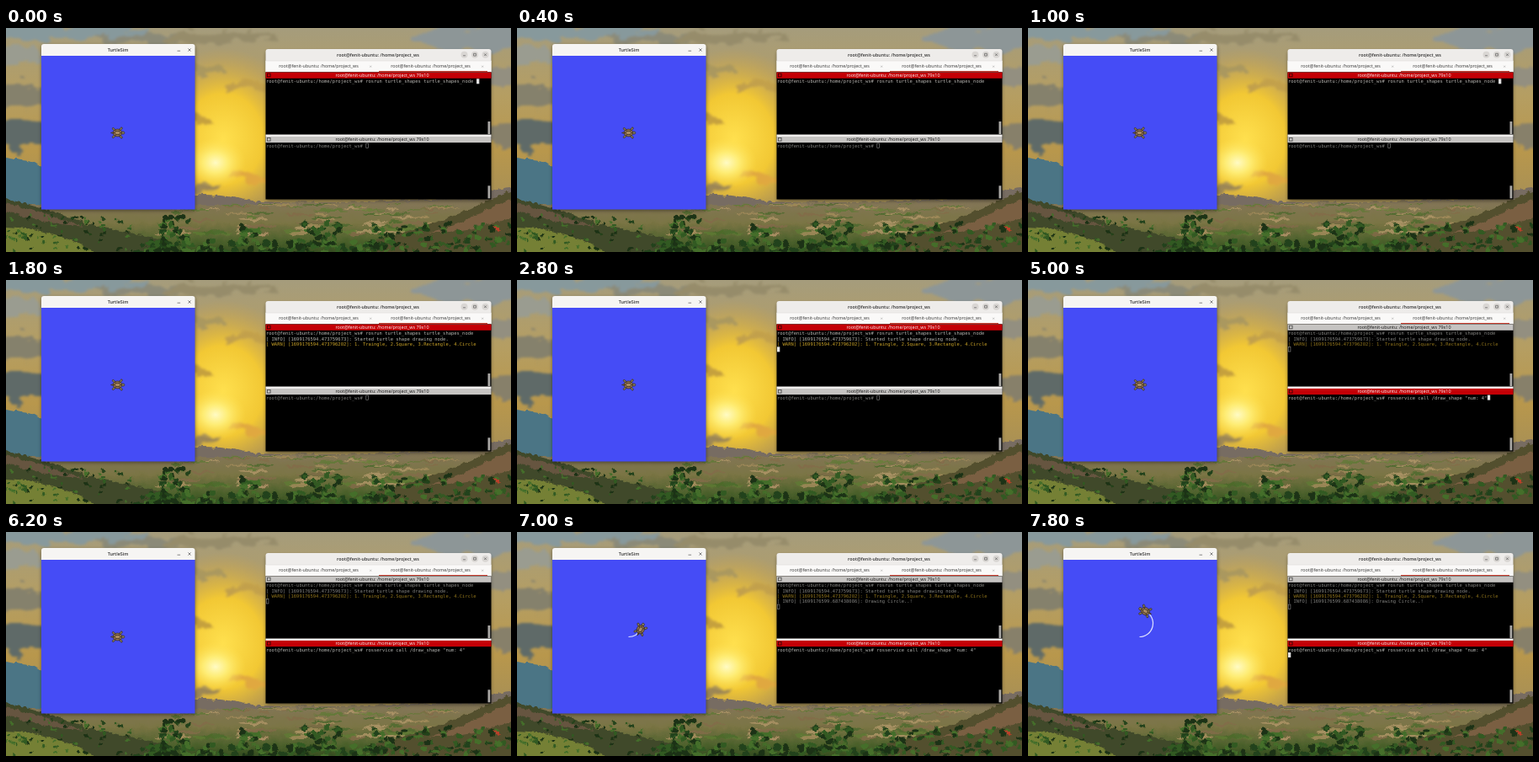
These frames come from a looping animation (600 px wide and 266 px high, 8 s). An HTML page:

```html
<!DOCTYPE html>
<html lang="en">
<head>
<meta charset="utf-8">
<title>Turtle shapes</title>
<style>
html, body { margin: 0; width: 100%; height: 100%; overflow: hidden; background: #444; }
svg { position: absolute; left: 0; top: 0; width: 600px; height: 266px; }
#scenery { will-change: transform; }
text { white-space: pre; }
.ui { font-family: "Open Sans", "Noto Sans", sans-serif; font-size: 5.36px; fill: #333; }
.mid { text-anchor: middle; }
.bold { font-weight: 600; }
.term { font-family: "DejaVu Sans Mono", monospace; font-size: 5.465px; fill: #b4b4b0; }
</style>
</head>
<body>
<svg id="scenery" viewBox="0 0 600 266" xmlns="http://www.w3.org/2000/svg">
  <defs>
    <linearGradient id="sky" x2="0" y2="1">
      <stop offset="0" stop-color="#a59c7c"/>
      <stop offset=".3" stop-color="#b59e62"/>
      <stop offset=".55" stop-color="#b8974c"/>
      <stop offset=".75" stop-color="#a89055"/>
      <stop offset="1" stop-color="#5c6a55"/>
    </linearGradient>
    <radialGradient id="glow">
      <stop offset="0" stop-color="#ffe04e"/>
      <stop offset=".5" stop-color="#f2c834"/>
      <stop offset="1" stop-color="#d0a545" stop-opacity="0"/>
    </radialGradient>
    <radialGradient id="sun">
      <stop offset="0" stop-color="#fffbc4"/>
      <stop offset=".4" stop-color="#fff07c" stop-opacity=".9"/>
      <stop offset="1" stop-color="#ffe04e" stop-opacity="0"/>
    </radialGradient>
    <linearGradient id="valley" x2="0" y2="1">
      <stop offset="0" stop-color="#85765a"/>
      <stop offset=".4" stop-color="#7a7444"/>
      <stop offset=".7" stop-color="#4a602b"/>
      <stop offset="1" stop-color="#263f18"/>
    </linearGradient>
    <filter id="ragged" x="-10%" y="-10%" width="120%" height="120%">
      <feTurbulence type="fractalNoise" baseFrequency=".035 .06" numOctaves="4" seed="5"/>
      <feDisplacementMap in="SourceGraphic" scale="30" xChannelSelector="R" yChannelSelector="G"/>
      <feGaussianBlur stdDeviation="1.8"/>
    </filter>
    <filter id="rough" x="-5%" y="-10%" width="110%" height="120%">
      <feTurbulence type="fractalNoise" baseFrequency=".12" numOctaves="3" seed="9"/>
      <feDisplacementMap in="SourceGraphic" scale="7" xChannelSelector="R" yChannelSelector="G"/>
      <feGaussianBlur stdDeviation=".35"/>
    </filter>
  </defs>
  <rect width="600" height="266" fill="url(#sky)"/>
  <ellipse cx="258" cy="132" rx="95" ry="108" fill="url(#glow)"/>
  <g id="clouds" filter="url(#ragged)"></g>
  <ellipse cx="249" cy="160" rx="36" ry="30" fill="url(#sun)"/>
  <g filter="url(#rough)">
    <path d="M-9 152 Q25 156 50 166 T110 190 T225 202 Q262 206 310 208 V230 H-9Z" fill="#4b7585"/>
    <path d="M215 199 Q250 196 280 203 T430 206 T540 202 L610 186 V235 H215Z" fill="#776c62"/>
    <path d="M-9 208 Q130 212 260 210 T610 202 V276 H-9Z" fill="url(#valley)"/>
    <g id="fields"></g>
    <path d="M-9 203 Q30 207 58 219 T112 236 Q150 244 190 252 V276 H-9Z" fill="#41482a"/>
    <path d="M-9 207 Q26 212 48 221 T96 236 Q62 234 30 226 T-9 218Z" fill="#66543f"/>
    <path d="M-9 236 Q24 235 60 246 T118 276 H-9Z" fill="#748034"/>
    <path d="M610 190 Q578 202 560 211 T506 232 Q476 242 440 252 V276 H610Z" fill="#534f2d"/>
    <path d="M610 200 Q574 214 548 227 T500 244 Q556 242 610 222Z" fill="#7a5f43"/>
    <g id="trees"></g>
    <path d="M577 236 l8 1 3 4 -7 -1Z" fill="#b8402c"/>
  </g>
</svg>

<svg viewBox="0 0 600 266" xmlns="http://www.w3.org/2000/svg">
  <filter id="shadow" x="-10%" y="-10%" width="120%" height="125%"><feGaussianBlur stdDeviation="2"/></filter>
  <rect x="42" y="21" width="183" height="196" rx="3" opacity=".4" filter="url(#shadow)"/>
  <path d="M42 33 V22 Q42 19 45 19 H221.500 Q224.500 19 224.500 22 V33Z" fill="#f6f5f3"/>
  <rect x="42" y="33" width="182.500" height="182.500" fill="#454cf6"/>
  <text class="ui mid bold" x="133" y="28">TurtleSim</text>
  <path d="M203.500 27.200 h3.600 M216.400 24.400 l3.200 3.200 m0 -3.200 l-3.200 3.200" stroke="#555" stroke-width=".7"/>
  <path id="trail" fill="none" stroke="#dcdfff" stroke-width="1.2"/>
  <g id="turtle" stroke="#35291c" stroke-width=".7">
    <g fill="#8a8060">
      <ellipse cx="4" cy="-4.700" rx="2.200" ry="1.200" transform="rotate(-50 4 -4.700)"/>
      <ellipse cx="4" cy="4.700" rx="2.200" ry="1.200" transform="rotate(50 4 4.700)"/>
      <ellipse cx="-4.500" cy="-4.400" rx="2" ry="1.100" transform="rotate(45 -4.500 -4.400)"/>
      <ellipse cx="-4.500" cy="4.400" rx="2" ry="1.100" transform="rotate(-45 -4.500 4.400)"/>
      <ellipse cx="6.300" cy="0" rx="2" ry="1.600"/>
      <path d="M-5 -1 L-8 0 L-5 1Z"/>
    </g>
    <ellipse rx="5.200" ry="4.400" fill="#94744f"/>
    <path d="M-2 -2 H2 L3.300 0 L2 2 H-2 L-3.300 0Z M-2 -2 L-3 -3.600 M2 -2 L3 -3.600 M-2 2 L-3 3.600 M2 2 L3 3.600 M3.300 0 H5 M-3.300 0 H-5" fill="#ab8b62"/>
  </g>

  <rect x="309" y="28" width="267" height="177" rx="3" opacity=".45" filter="url(#shadow)"/>
  <path d="M308.500 52 V28 Q308.500 25 311.500 25 H573.500 Q576.500 25 576.500 28 V52Z" fill="#eeecea"/>
  <path d="M308.500 39 H576.500 V52.500 H308.500Z" fill="#faf9f8"/>
  <path d="M308.500 39 H576.500" stroke="#dedbd8" stroke-width=".6"/>
  <g fill="#d9d6d3"><circle cx="544.500" cy="31.700" r="4"/><circle cx="557" cy="31.700" r="4"/><circle cx="569.500" cy="31.700" r="4"/></g>
  <path d="M543 32.800 h3 M555.600 30.300 h2.800 v2.800 h-2.800Z M568.200 30.400 l2.600 2.600 m0 -2.600 l-2.600 2.600" fill="none" stroke="#444" stroke-width=".6"/>
  <text class="ui mid bold" x="442" y="33.700" id="title"></text>
  <text class="ui mid" x="371.500" y="47" id="tabA"></text>
  <text class="ui mid" x="504.500" y="47" id="tabB"></text>
  <path d="M432.200 44.700 l2 2 m0 -2 l-2 2 M565.200 44.700 l2 2 m0 -2 l-2 2" stroke="#999" stroke-width=".5"/>
  <path d="M443 51.500 H572" stroke="#c8392b" stroke-width="1"/>
  <rect x="308.500" y="52.500" width="268" height="151" fill="#000"/>
  <rect x="308.500" y="126.500" width="268" height="2.500" fill="#f4f2f0"/>
  <g id="panes"></g>
</svg>

<script>
const LOOP = 8000, STEP = 200;
const CELL = 3.29, ROW = 6.35, LEFT = 309;
const HOST = "root@fenit-ubuntu";
const PROMPT = HOST + ":/home/project_ws# ";
const TITLE = HOST + ": /home/project_ws";
const AMBER = "#c9a227";

// Times of the events, in ms
const RUN = 1200, READY = 1400, FOCUS = 3200, ENTER = 6400, DRAW = 6600;
const TYPING = [
  [4000, "r"],
  [4400, "rosservice call /"],
  [4800, "rosservice call /draw_shape"],
  [5000, 'rosservice call /draw_shape "num: 4"']
];
// Spans in which the blinking cursor is lit
const LIT = [[0, 200], [800, 1800], [2400, 3000], [3200, 3800], [4000, 5600], [6400, 7000], [7600, 8000]];
const MOVE = 6450, SPIN = 2, RADIUS = 16, START = { x: 132.5, y: 124.5 };

const $ = id => document.getElementById(id);

function add(parent, tag, attrs = {}, text = "") {
  const el = document.createElementNS("http://www.w3.org/2000/svg", tag);
  set(el, attrs);
  el.textContent = text;
  return parent.appendChild(el);
}

function set(el, attrs) {
  for (const key in attrs) el.setAttribute(key, attrs[key]);
}

function seeded(seed) {
  return () => (seed = (seed * 16807) % 2147483647) / 2147483647;
}

function paintClouds() {
  const clouds = [
    [60, 4, 110, 10, "#87999c"], [175, 12, 70, 6, "#8b8a78"],
    [560, 12, 75, 18, "#8d9697"], [10, 32, 45, 8, "#9a9c90"],
    [14, 82, 42, 15, "#85816c"], [10, 126, 46, 17, "#5f6a68"],
    [250, 12, 65, 7, "#968c6a"], [232, 48, 30, 7, "#aa985f"],
    [290, 66, 28, 6, "#c2a04c"], [230, 108, 16, 6, "#c5a03e"],
    [290, 178, 34, 5, "#e0a83f"], [230, 190, 30, 5, "#9c8654"],
    [592, 58, 24, 15, "#938f80"], [592, 125, 26, 17, "#87806a"]
  ];
  for (const [cx, cy, rx, ry, fill] of clouds) add($("clouds"), "ellipse", { cx, cy, rx, ry, fill });
}

function paintLand() {
  const rnd = seeded(41);
  const tones = ["#a58d5c", "#5f7a35", "#b3986a", "#4c6a2c", "#846c4a"];
  for (let i = 0; i < 90; i++) {
    const cy = 209 + rnd() * 36;
    add($("fields"), "ellipse", {
      cx: 195 + rnd() * 330, cy, rx: 6 + rnd() * 16,
      ry: 0.6 + (cy - 205) * 0.04, fill: tones[i % tones.length], opacity: 0.8
    });
  }
  const greens = ["#24421a", "#315a24", "#1b3213", "#446e2c"];
  const grove = (count, x, y, w, h, size) => {
    for (let i = 0; i < count; i++) add($("trees"), "ellipse", {
      cx: x + rnd() * w, cy: y + rnd() * h,
      rx: size * (0.6 + rnd()), ry: size * (0.5 + rnd() * 0.6),
      fill: greens[Math.floor(rnd() * greens.length)]
    });
  };
  grove(110, 150, 252, 310, 16, 4);
  grove(40, 186, 224, 30, 40, 3.2);
  grove(22, 278, 233, 22, 25, 3.2);
  grove(34, 350, 232, 48, 26, 3.4);
  grove(70, 0, 222, 150, 44, 2);
  grove(90, 430, 232, 170, 34, 2.8);
}

class Pane {
  constructor(top, rows) {
    const root = $("panes");
    this.top = top;
    this.bar = add(root, "rect", { x: 308.5, y: top + 0.6, width: 268, height: 7.2 });
    this.icon = add(root, "rect", { x: 310.5, y: top + 2.2, width: 3.6, height: 3.6, fill: "none", "stroke-width": 0.8 });
    this.name = add(root, "text", { class: "ui mid", x: 447, y: top + 6 }, TITLE + " 79x10");
    this.body = add(root, "g");
    this.lines = Array.from({ length: rows }, (_, i) =>
      add(this.body, "text", { class: "term", x: LEFT, y: this.rowY(i) + 4.9 }));
    this.cursor = add(this.body, "rect", { width: CELL, height: 6 });
    add(root, "rect", { x: 572.5, y: top + 59, width: 2.8, height: 15, fill: "#aaa8a5" });
  }

  rowY(row) { return this.top + 8.3 + row * ROW; }

  draw(lines, active, col, row, lit) {
    set(this.bar, { fill: active ? "#c40006" : "#c6c4c2" });
    set(this.icon, { stroke: active ? "#300" : "#444" });
    this.name.style.fill = active ? "#fff" : "#111";
    set(this.body, { opacity: active ? 1 : 0.72 });
    this.lines.forEach((el, i) => {
      el.textContent = lines[i] || "";
      el.style.fill = el.textContent.startsWith("[ WARN]") ? AMBER : "";
    });
    const inset = active ? 0 : 0.35;
    set(this.cursor, {
      x: LEFT + col * CELL + inset, y: this.rowY(row) + inset,
      width: CELL - 2 * inset, height: 6 - 2 * inset,
      fill: active ? "#e4e4e4" : "none",
      stroke: active ? "none" : "#c4c4c4", "stroke-width": 0.6,
      visibility: !active || lit ? "visible" : "hidden"
    });
  }
}

function drawTerminals(t) {
  const lit = LIT.some(([from, to]) => t >= from && t < to);
  const first = [PROMPT + "rosrun turtle_shapes turtle_shapes_node "];
  if (t >= READY) first.push(
    "[ INFO] [1699176594.473759673]: Started turtle shape drawing node.",
    "[ WARN] [1699176594.473796202]: 1. Traingle, 2.Square, 3.Rectangle, 4.Circle");
  if (t >= DRAW) first.push("[ INFO] [1699176599.687438086]: Drawing Circle..!");
  const running = t >= RUN;
  upper.draw(first, t < FOCUS, running ? 0 : first[0].length, running ? first.length : 0, lit);

  const typed = TYPING.filter(k => k[0] <= t).pop();
  const line = PROMPT + (typed ? typed[1] : "");
  const sent = t >= ENTER;
  lower.draw([line], t >= FOCUS, sent ? 0 : line.length, sent ? 1 : 0, lit);
}

function drawTurtle(t) {
  const angle = Math.max(0, (t - MOVE) / 1000 * SPIN);
  const x = START.x + RADIUS * Math.sin(angle);
  const y = START.y - RADIUS * (1 - Math.cos(angle));
  set($("turtle"), { transform: `translate(${x} ${y}) rotate(${-angle * 180 / Math.PI})` });
  set($("trail"), {
    d: angle ? `M${START.x} ${START.y} A${RADIUS} ${RADIUS} 0 0 0 ${x} ${y}` : ""
  });
}

let shown = -1;
function render(ms) {
  const t = Math.floor((ms % LOOP) / STEP) * STEP;
  if (t === shown) return;
  shown = t;
  drawTerminals(t);
  drawTurtle(t);
}

paintClouds();
paintLand();
for (const id of ["title", "tabA", "tabB"]) $(id).textContent = TITLE;
const upper = new Pane(52, 5), lower = new Pane(128.3, 2);
const begin = performance.now();
function tick() {
  render(performance.now() - begin);
  requestAnimationFrame(tick);
}
tick();
</script>
</body>
</html>
```
